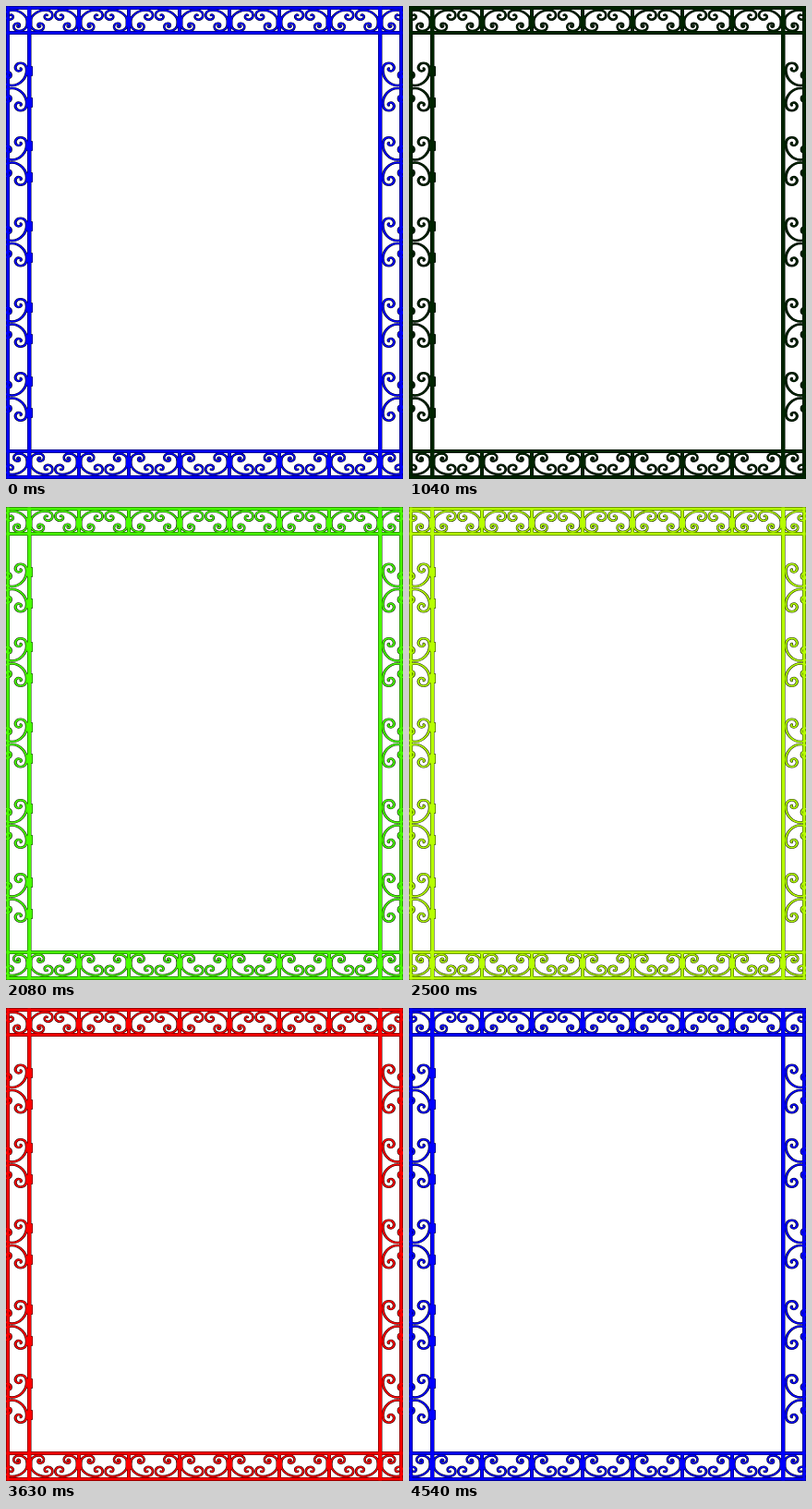
An HTML page for the animation above (4580 ms loop, 430 by 512 pixels).

```html
<!DOCTYPE html>
<html lang="en">
<head>
<meta charset="utf-8">
<title>Wrought frame</title>
<style>
html, body { margin: 0; width: 100%; height: 100%; overflow: hidden; background: #fff; }
svg { display: block; width: 430px; height: 512px; }
#arm { fill: none; stroke: currentColor; stroke-linecap: round; stroke-linejoin: round; }
.bar { fill: currentColor; }
</style>
</head>
<body>
<svg viewBox="0 0 430 512">
  <defs>
    <!-- One arm: big C with a curl at each end; x runs away from the post, y away from the rail -->
    <path id="arm" d="M20 5.8C17.5 4.5 16 8 18 9.7C21 12 25.7 10 25.7 6C25.7 2 22 .5 18 .5C10 .5 1.5 6 1.5 14C1.5 20 6 23 10.5 23C15 23 17.3 20 16 16.8C14.5 13.8 9.7 14.3 9.8 17C10 19 12 19.2 12.4 17.6"/>
    <g id="unit">
      <use href="#arm"/>
      <use href="#arm" transform="scale(-1 1)"/>
    </g>
  </defs>
  <g id="dark" stroke-width="2.6"></g>
  <g id="light" stroke-width="1.4"></g>
</svg>
<script>
const LOOP = 4580, STEPS = 71;
const COLORS = [[0, 0, 255], [0, 0, 0], [0, 255, 0], [255, 255, 0], [255, 0, 0]];
const SIDE_Y = [87.5, 168, 255.5, 343, 423];
const EDGE = 0.5;
const dark = document.getElementById('dark');
const light = document.getElementById('light');

function add(parent, tag, attrs) {
  const el = document.createElementNS('http://www.w3.org/2000/svg', tag);
  for (const k in attrs) el.setAttribute(k, attrs[k]);
  parent.appendChild(el);
}
function unit(transform) {
  for (const g of [dark, light]) add(g, 'use', { href: '#unit', transform });
}
// A bright bar with a thin dark rim
function bar(x, y, w, h, rx = 0) {
  for (const [g, e] of [[dark, 0], [light, EDGE]]) {
    add(g, 'rect', { class: 'bar', x: x + e, y: y + e, width: w - 2 * e, height: h - 2 * e, rx });
  }
}

// Rails
for (const [y, h] of [[0, 4], [27, 4], [480, 4], [508, 4]]) bar(0, y, 430, h);
for (const [x, w] of [[0, 4], [23, 4.5], [403, 4.5], [426, 4]]) bar(x, 0, w, 512);

// Top and bottom bands
for (let i = 0; i < 8; i++) {
  const x = 24.7 + 54.3 * i, px = Math.round(x);
  unit(`translate(${x} 4)`);
  unit(`translate(${x} 507.5) scale(1 -1)`);
  for (const y of [1, 481]) bar(px - 2, y, 4, 29);
  for (const y of [11, 488]) bar(px - 3.5, y, 7, 12, 2);
}

// Side bands: same motif, a little deeper and cut by the outer rail
for (const y of SIDE_Y) {
  unit(`translate(23 ${y}) rotate(90) scale(1 1.2)`);
  unit(`translate(407.5 ${y}) rotate(-90) scale(1 1.2)`);
  for (const d of [-17, 17]) bar(22, Math.round(y + d - 5.5), 7, 11, 1);
}

function draw(ms) {
  const step = Math.floor((ms % LOOP) / LOOP * STEPS);
  const n = COLORS.length, p = step / (STEPS - 1) * n;
  const i = Math.floor(p), a = COLORS[i % n], b = COLORS[(i + 1) % n];
  const c = a.map((v, k) => v + (b[k] - v) * (p - i));
  const rgb = f => `rgb(${c.map(v => Math.round(v * f)).join(',')})`;
  dark.setAttribute('color', rgb(0.2));
  light.setAttribute('color', rgb(1));
}

const start = performance.now();
function tick() {
  draw(performance.now() - start);
  requestAnimationFrame(tick);
}
tick();
</script>
</body>
</html>
```
